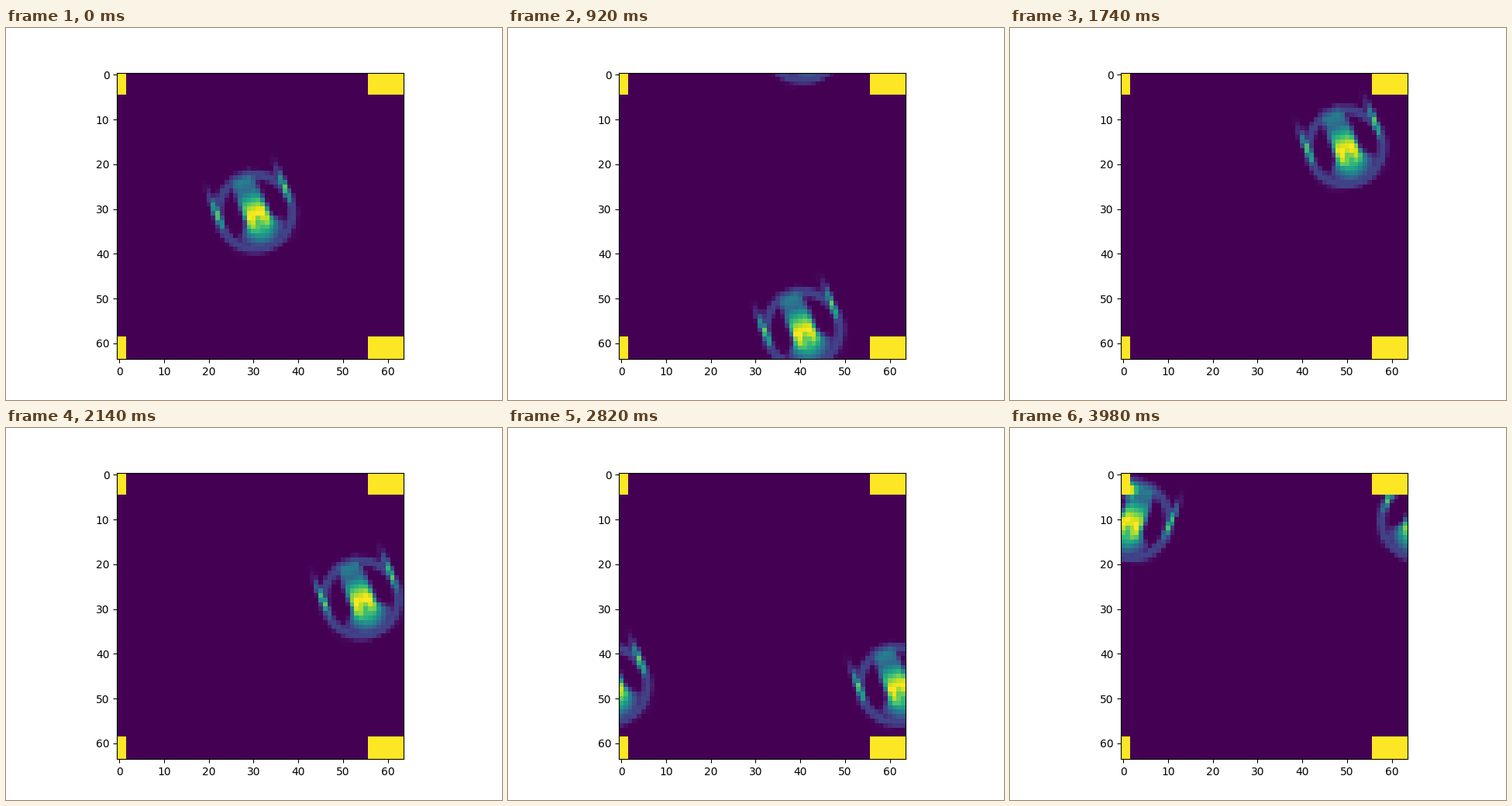
A matplotlib script that plays this animation: 640 by 480 pixels, repeating every 4 s.

```python
import numpy as np
import matplotlib.pyplot as plt
from matplotlib.animation import FuncAnimation

N = 64
STEPS = 200
RADIUS = 8.3
TILT = np.radians(21.7)
rows, cols = np.mgrid[0:N, 0:N].astype(float)

# centre of the creature, unwrapped: straight glide, contact, rebound
PATH_T = [0, 141, 176, 199]
PATH_X = [30.4, 61.6, 69, 66]
PATH_Y = [30.7, 111, 125.8, 138.3]


def ramp(x):
    return np.clip(x, 0, 1)


def smooth(x):
    x = ramp(x)
    return x * x * (3 - 2 * x)


def bell(x, width):
    return np.exp(-(x / width) ** 2)


def wrap(d):
    return (d + N / 2) % N - N / 2


def glow(x, y, rx, ry):
    return bell(wrap(cols - x), rx) * bell(wrap(rows - y), ry)


def body(s, q, flare):
    """Head, neck and core with sharp flanks, fanning out to the front."""
    axis = np.interp(s, [-10, -7.5, -5, 0.5, 2.5, 9.2],
                     [0, 0.43, 0.34, 1.1, 0.97, 0])
    fan = smooth((s - 1) / 4)
    flank = np.exp(-(np.abs(q) / (2.8 + 1.4 * fan)) ** (6 - 4 * fan))
    groove = 0.28 * bell(q, 1) * bell(s - 2.3, 1.9)
    dim = 0.45 * flare * ramp((2 - s) / 4)
    return axis * flank * (1 - groove) * (1 - dim)


def creature(dx, dy, angle, flare):
    # s runs along the heading, q across it
    s = dx * np.sin(angle) + dy * np.cos(angle)
    q = dx * np.cos(angle) - dy * np.sin(angle)
    side = np.abs(q)

    ring = ramp(1.5 - np.abs(np.hypot(s, q) - RADIUS))
    ring *= 0.2 + 0.5 * flare * ramp(side / RADIUS)
    arms = 0.78 * bell(s + 2.5, 4) * ramp(1.1 - np.abs(side - 8.1))
    return np.max([ring, arms, body(s, q, flare)], axis=0)


def world(t):
    dx = wrap(cols - np.interp(t, PATH_T, PATH_X))
    dy = wrap(rows - np.interp(t, PATH_T, PATH_Y))
    angle = TILT * (1 - 2 * smooth((t - 178) / 16))
    flare = bell(t - 176, 10)

    # the side touching the block lights up
    a = np.max([
        creature(dx, dy, angle, flare),
        1.3 * flare * glow(1, 61, 2.6, 4.2),
        bell(t - 199, 10) * glow(2, 67.5, 1.6, 2),
    ], axis=0)

    # fixed block, wrapped around the corners
    a[np.ix_(np.arange(59, 69) % N, np.arange(56, 66) % N)] = 1
    return ramp(a)


fig, ax = plt.subplots(figsize=(6.4, 4.8), dpi=100)
image = ax.imshow(world(0), cmap="viridis", vmin=0, vmax=1,
                  interpolation="nearest")


def update(t):
    image.set_data(world(t))
    return [image]


anim = FuncAnimation(fig, update, frames=STEPS, interval=20,
                     repeat=True, repeat_delay=0, blit=False)
plt.show()
```
